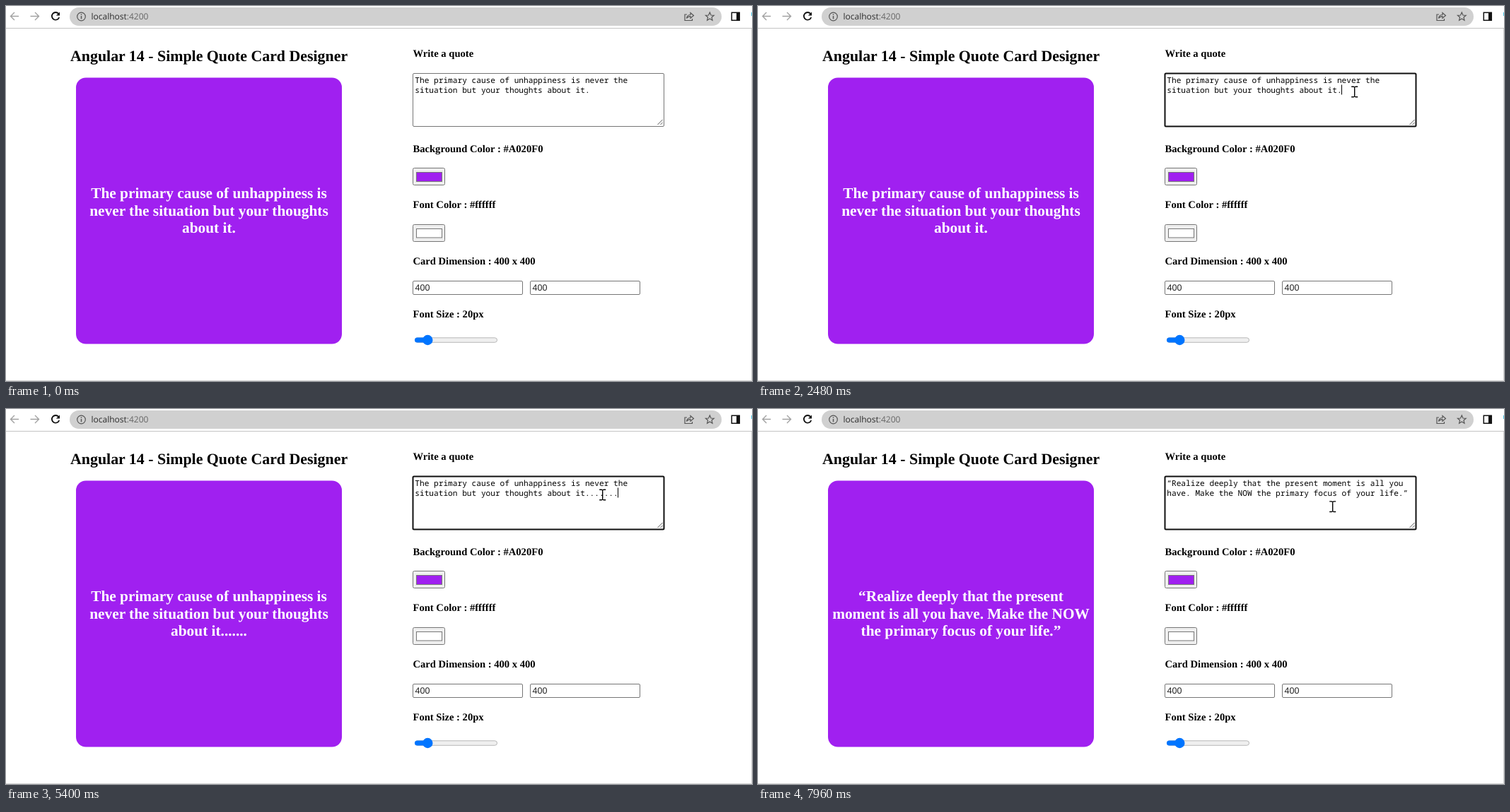
Write an HTML page that moves like this. It is 1055 by 531 pixels and loops after 8000 ms.

```html
<!DOCTYPE html>
<html lang="en">
<head>
<meta charset="utf-8">
<title>Quote card designer</title>
<style>
  html, body { margin: 0; width: 100%; height: 100%; overflow: hidden; background: #fff; }
  svg { display: block; width: 1055px; height: 531px; }
  text { text-rendering: geometricPrecision; white-space: pre; }
  .serif { font: bold 14.6px "Liberation Serif", serif; }
  .title { font-size: 21.88px; }
  .card { font-size: 21.33px; fill: #fff; text-anchor: middle; }
  .mono { font: 11.15px "Noto Sans Mono", monospace; }
  .num { font: 12.53px "Liberation Sans", sans-serif; fill: #222; }
  .url { font: 12px "Open Sans", sans-serif; fill: #2b2b2b; }
  .field { fill: #fff; stroke: #767676; }
  .button { fill: #efefef; stroke: #767676; }
  .icon { fill: none; stroke: #555; stroke-width: 1.2; }
  #beam { fill: none; stroke: #fff; stroke-width: 1.4; mix-blend-mode: difference; }
</style>
</head>
<body>
<svg viewBox="0 0 1055 531">
  <rect width="1055" height="531" fill="#fff"/>

  <!-- browser bar -->
  <rect x="90" y="2" width="922" height="26" rx="13" fill="#d0d0d0"/>
  <path d="M0 31.5H1055" stroke="#c4c4c4"/>
  <path d="M1054.5 32V530.5H0" fill="none" stroke="#d4d4d4"/>
  <path d="M1054.5 9V14" stroke="#4cc8e8"/>
  <g class="icon">
    <path d="M18 14.5H7M12 9L6.5 14.5L12 20M34.500 14.5H46M41 9L46.500 14.5L41 20" stroke="#a2a2a2" stroke-width="1.4"/>
    <path d="M74.300 11A5.300 5.300 0 1 0 75.200 16" stroke="#111" stroke-width="1.8"/>
    <path d="M76 8.500V13.600H70.900Z" fill="#111" stroke="none"/>
    <circle cx="106.500" cy="15" r="5.800"/>
    <path d="M106.500 14V18.300M106.500 11.300V12.800" stroke-width="1.500"/>
    <path d="M963 12H960V20.500H970.500V18M962.500 17.500C963 14 965 12.500 968 12.500V9.500L972.500 13.500L968 17.300V14.700C965.500 14.700 964 15.500 962.500 17.500Z"/>
    <path d="M995.300 9L997 13L1001.200 13.300L998 16L999 20.200L995.300 18L991.600 20.200L992.600 16L989.400 13.300L993.600 13Z"/>
    <rect x="1026.300" y="9.300" width="11" height="11" stroke="#111" stroke-width="1.500"/>
    <path d="M1033 9H1038V21H1033Z" fill="#111" stroke="none"/>
  </g>
  <text class="url" x="120.500" y="19">localhost<tspan fill="#666">:4200</tspan></text>

  <!-- card -->
  <text class="serif title" x="91" y="78">Angular 14 - Simple Quote Card Designer</text>
  <rect x="99" y="101.500" width="376" height="377" rx="14" fill="#a020f0"/>
  <g id="card"></g>

  <!-- form -->
  <g class="serif">
    <text x="575.500" y="72">Write a quote</text>
    <text x="575.500" y="206.500">Background Color : #A020F0</text>
    <text x="575.500" y="286.300">Font Color : #ffffff</text>
    <text x="575.500" y="366">Card Dimension : 400 x 400</text>
    <text x="575.500" y="441">Font Size : 20px</text>
  </g>
  <rect id="area" class="field" x="575.500" y="95.500" width="355" height="75" rx="1.500"/>
  <path d="M921.500 168L928.500 161M925.500 168L928.500 165" stroke="#555"/>
  <path id="selection" d="M578 97H892V111H866V125.500H578Z" fill="#3390ff"/>
  <g id="quote"></g>
  <path id="caret" d="M0 111.500V125.500" stroke="#000"/>

  <rect class="button" x="575.500" y="229.500" width="45" height="24" rx="2"/>
  <rect x="580.500" y="235.500" width="36" height="13" fill="#a020f0" stroke="#777"/>
  <rect class="button" x="575.500" y="309.500" width="45" height="24" rx="2"/>
  <rect x="580.500" y="315.500" width="36" height="12.500" fill="#fff" stroke="#777"/>
  <rect class="field" x="575.500" y="389.500" width="155" height="19" rx="1.500"/>
  <rect class="field" x="741.500" y="389.500" width="155" height="19" rx="1.500"/>
  <text class="num" x="578.500" y="403">400</text>
  <text class="num" x="744.500" y="403">400</text>
  <rect x="578.500" y="469.800" width="116" height="6.500" rx="3.250" fill="#efefef" stroke="#b8b8b8"/>
  <rect x="578" y="469.500" width="22" height="7" rx="3.500" fill="#0075ff"/>
  <circle cx="596.300" cy="473" r="7.200" fill="#0075ff"/>

  <path id="arrow" d="M.5 .5V15.500L4 12.300L6.300 17.300L8.500 16.300L6.300 11.500H11Z" fill="#fff" stroke="#000" stroke-width=".9"/>
  <path id="beam" d="M-4.500 -7.300H-1.500L0 -6.500L1.500 -7.300H4.500M0 -6.500V6.500M-4.500 7.300H-1.500L0 6.500L1.500 7.300H4.500"/>
</svg>
<script>
const $ = id => document.getElementById(id);
const LOOP = 8000, CHAR = 6.69, LEFT = 578.3;
const ENTER = 1160, MOVE = 1640, FOCUS = 2300, SELECT = 5880, PASTE = 7130, LEAVE = 7960;
const keyTimes = [3340, 3620, 3820, 3940, 4140, 4340];
const BLINK = 530;

const makeLines = (parent, cls, x, ys) => ys.map(y => {
  const line = document.createElementNS('http://www.w3.org/2000/svg', 'text');
  line.setAttribute('class', cls);
  line.setAttribute('x', x);
  line.setAttribute('y', y);
  return parent.appendChild(line);
});
const cardLines = makeLines($('card'), 'serif card', 287, [272.3, 296.7, 321]);
const quoteLines = makeLines($('quote'), 'mono', LEFT, [108.5, 122.5]);

const write = (lines, texts) => lines.forEach((line, i) => {
  if (line.textContent !== texts[i]) line.textContent = texts[i];
});
const show = (id, on) => $(id).style.display = on ? '' : 'none';
const place = (id, [x, y]) => $(id).setAttribute('transform', `translate(${x} ${y})`);
const mix = (a, b, k) => a.map((v, i) => v + (b[i] - v) * k);

// Progress in whole steps, about 15 pointer samples per second
const steps = (t, start) => Math.floor((t - start) / 66.6) + 1;

function pointer(t) {
  if (t >= LEAVE) return [812.7, 138.2];
  if (t < MOVE) return mix([951, 390], [876, 236], Math.min(1, (steps(t, ENTER) - 1) / 3));
  return mix([876, 236], [843.7, 121.5], Math.min(1, steps(t, MOVE) / 7));
}

function draw(t) {
  const pasted = t >= PASTE, selected = t >= SELECT && !pasted, focused = t >= FOCUS;
  const dots = '.'.repeat(1 + keyTimes.filter(k => t >= k).length);

  const quote = pasted
    ? ['“Realize deeply that the present moment is all you', 'have. Make the NOW the primary focus of your life.”']
    : ['The primary cause of unhappiness is never the', 'situation but your thoughts about it' + dots];
  write(quoteLines, quote);
  write(cardLines, pasted
    ? ['“Realize deeply that the present', 'moment is all you have. Make the NOW', 'the primary focus of your life.”']
    : ['The primary cause of unhappiness is', 'never the situation but your thoughts', 'about it' + dots]);
  $('quote').setAttribute('fill', selected ? '#fff' : '#000');
  show('selection', selected);

  // Each edit restarts the caret blink
  const lastEdit = Math.max(...[FOCUS, ...keyTimes, PASTE].filter(k => t >= k));
  show('caret', focused && !selected && Math.floor((t - lastEdit) / BLINK) % 2 === 0);
  place('caret', [Math.floor(LEFT + quote[1].length * CHAR) + .5, 0]);

  const at = pointer(t), inside = at[1] < 171;
  show('arrow', t >= ENTER && !inside);
  show('beam', inside);
  place(inside ? 'beam' : 'arrow', at);
  $('area').style.stroke = focused ? '#101010' : inside ? '#444' : '#767676';
  $('area').style.strokeWidth = focused ? 2 : 1;
}

function tick() {
  draw(performance.now() % LOOP);
  requestAnimationFrame(tick);
}
tick();
</script>
</body>
</html>
```
